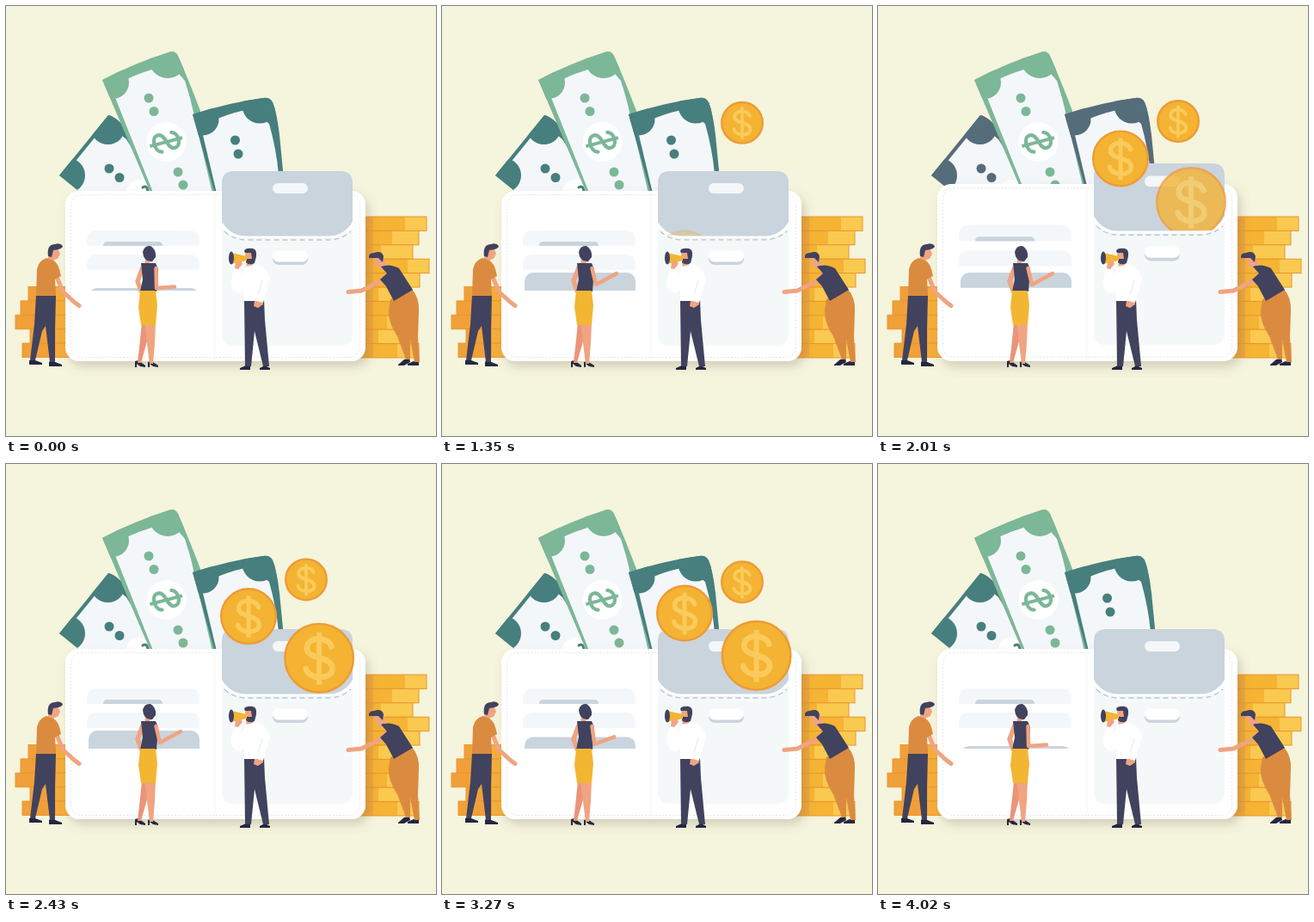
An HTML page for the animation above (4.05 s loop, 500 by 500 pixels).

```html
<!DOCTYPE html>
<html lang="en">
<head>
<meta charset="utf-8">
<title>Wallet</title>
<style>
  html, body { margin: 0; width: 100%; height: 100%; overflow: hidden; background: #f5f4dd; }
  svg { display: block; width: 100%; height: 100%; }
  .teal { fill: var(--teal, #467f7d); }
  .green { fill: #7cb798; }
  .paper { fill: #f4f7fa; }
  .white { fill: #fff; }
  .grey { fill: #cad4dd; }
  .navy { fill: #41425d; }
  .dark { fill: #25273f; }
  .skin { fill: #f0a481; }
  .rust { fill: #db8b3f; }
  .line { fill: none; stroke-linecap: round; stroke-linejoin: round; }
  .limb { stroke: #f0a481; }
</style>
</head>
<body>
<svg viewBox="0 0 500 500">
  <defs>
    <filter id="shadow" x="-10%" y="-10%" width="125%" height="130%">
      <feDropShadow dx="4" dy="6" stdDeviation="6" flood-color="#75705a" flood-opacity=".28"/>
    </filter>
    <g id="dollar" class="line">
      <path d="M14 -13C10 -25 -14 -25 -14 -11C-14 2 15 -3 15 12C15 25 -12 25 -15 12" stroke-width="6.5"/>
      <path d="M0 -29V30" stroke-width="6" stroke-linecap="butt"/>
    </g>
    <clipPath id="slit"><rect id="slitEdge" width="500" height="267"/></clipPath>
    <clipPath id="cardEdge"><rect id="pocketEdge" x="90" width="140" height="331"/></clipPath>
    <clipPath id="billA"><path d="M62 197L119 127Q133 130 146 155L190 240H115Z"/></clipPath>
    <clipPath id="billB"><path d="M112 86Q150 66 189 54Q196 51 200 58Q212 85 226 122L250 222H170Z"/></clipPath>
    <clipPath id="billC"><path d="M217 126Q260 112 299 107Q307 106 310 112Q315 124 318 150L325 222H244Z"/></clipPath>
  </defs>
  <rect width="500" height="500" fill="#f5f4dd"/>
  <g id="stacks"></g>

  <g clip-path="url(#billA)">
    <rect class="teal" x="50" y="120" width="150" height="110"/>
    <path class="paper" d="M65 200L117 136L140 155L190 235H105Z"/>
    <circle class="teal" cx="118.500" cy="141" r="20"/>
    <circle class="teal" cx="72" cy="197" r="20"/>
    <circle class="teal" cx="120" cy="189" r="5.500"/>
    <circle class="teal" cx="132" cy="199.500" r="5.500"/>
    <circle class="white" cx="156" cy="219" r="17"/>
    <path class="line" d="M159 211Q164 208 165 215" stroke="#467f7d" stroke-width="3"/>
  </g>
  <g clip-path="url(#billB)">
    <rect class="green" x="105" y="45" width="145" height="180"/>
    <path class="paper" d="M122 94Q155 76 192 68L208 87Q215 108 219 128L241 222H173Z"/>
    <circle class="green" cx="124" cy="89" r="19"/>
    <circle class="green" cx="188" cy="62" r="22"/>
    <circle class="green" cx="166" cy="107" r="5.500"/>
    <circle class="green" cx="172" cy="122.500" r="5.500"/>
    <circle class="green" cx="200" cy="193" r="5.500"/>
    <circle class="green" cx="206" cy="208" r="5.500"/>
    <circle class="white" cx="186.500" cy="158" r="23"/>
    <use href="#dollar" stroke="#7cb798" transform="translate(186.500 158) rotate(75) scale(-.66 .66)"/>
  </g>
  <g clip-path="url(#billC)">
    <rect class="teal" x="210" y="100" width="120" height="125"/>
    <path class="paper" d="M228 146L235 136Q255 126 278 121L300 132L306 137Q314 165 317 195V222H246Z"/>
    <circle class="teal" cx="229" cy="132" r="18.500"/>
    <circle class="teal" cx="295" cy="116" r="20.500"/>
    <circle class="teal" cx="266.500" cy="156" r="5.500"/>
    <circle class="teal" cx="270" cy="172" r="5.500"/>
  </g>

  <g id="wallet">
    <rect class="white" x="69" y="215" width="349" height="198" rx="16" filter="url(#shadow)"/>
    <rect x="75.500" y="219.500" width="336" height="189" rx="12" fill="none" stroke="#e4e8ec" stroke-dasharray="2 2"/>
    <path d="M243 217V411" stroke="#f8f9fa" stroke-width="2"/>
    <path class="paper" d="M94 279V273Q94 261 106 261H213Q225 261 225 273V279Z"/>
    <path class="grey" d="M113 279Q113 274 118 274H177Q182 274 182 279Z"/>
    <path class="paper" d="M94 307V301Q94 289 106 289H213Q225 289 225 301V307Z"/>
    <rect x="251" y="222" width="152" height="173" rx="12" fill="#f4f8f9"/>
    <path class="white" d="M251 240H403V258Q392 269 378 269.500H276Q262 269 251 258Z"/>
    <path class="grey" d="M251 206Q251 192 265 192H389Q403 192 403 206V251Q393 267 376 267.500H278Q261 267 251 251Z"/>
    <path d="M254 262Q264 272 280 272H374Q390 272 401 262" fill="none" stroke="#b9c5cf" stroke-width="1.300" stroke-dasharray="6 4"/>
    <rect class="paper" x="310" y="206" width="41" height="12" rx="6"/>
    <rect class="grey" x="310" y="287" width="41" height="14" rx="7"/>
    <rect class="white" x="310" y="284.500" width="41" height="13" rx="6.500"/>
  </g>
  <g clip-path="url(#cardEdge)">
    <rect id="card" class="grey" x="96" y="310" width="129" height="40" rx="10"/>
  </g>
  <g id="coins" clip-path="url(#slit)"></g>

  <!-- man on the left -->
  <g>
    <path class="dark" d="M27 412H34L42 415V417H27ZM50 413.500H56L65 417V419H50Z"/>
    <path class="navy" d="M35 336H58L57 375L57 414H51L46 372L42 378L34 412H28L33 370Z"/>
    <path class="skin" d="M51 283H61L63 288L60 294L56 295L55 302L48 298Z"/>
    <path class="navy" d="M49 291Q47 277 57 277Q63 275 66 279Q66 283 55 284L53 292Z"/>
    <path class="line limb" d="M57 310L66 332L79 344L85 348.500" stroke-width="5"/>
    <path class="rust" d="M47 293Q38 296 36 306L35 337H58L57 318L64 314Q61 298 55 296Z"/>
  </g>

  <!-- woman -->
  <g>
    <path class="dark" d="M150 413L154 412L162 418V420L156 419L152 416V420H150ZM165 414L169 413L177 418V420L171 419L167 416V420H165Z"/>
    <path fill="#ea947a" d="M158 368H168L164 390L157 415H153L156 388Z"/>
    <path class="skin" d="M161 368H174L173 392L171 416H167L164 392Z"/>
    <path class="line limb" d="M159 304L153 320L157 331" stroke-width="5.500"/>
    <path class="skin" d="M163 285L172 287L171 296L167 298V303H161Z"/>
    <path class="navy" d="M159 286Q161 278 168 279Q175 283 174 292L170 297Q160 298 159 286Z"/>
    <path class="navy" d="M157 299H174L177 306L175 332H156L159 318Z"/>
    <path fill="#f3b632" d="M156 331H174L176 348L174 371H157L154 350Z"/>
    <path id="arm" class="line limb" stroke-width="4.500"/>
  </g>

  <!-- man with the megaphone -->
  <g>
    <path class="dark" d="M272 423V421L279 418H284V423ZM295 423V421L301 418L307 421V423Z"/>
    <path class="navy" d="M277 341H300L301 365L306 419H299L289 378L285 419H278Z"/>
    <path class="skin" d="M278 287H287V306H280ZM289 343L298 340L299 347L293 351L288 349Z"/>
    <path class="white" d="M279 303L292 300Q305 305 307 318L299 345L292 343H277V331L271 334Q262 332 261 322L265 306L274 307L273 314Z"/>
    <path d="M298 319L293 336" fill="none" stroke="#e5e9ef"/>
    <path class="navy" d="M277 285Q278 281 287 282Q292 283 291 291L289 299Q283 302 279 298L280 294L286 294L285 287H278Z"/>
    <path fill="#f3b632" d="M262 287L280 291V296L262 300Z"/>
    <ellipse class="navy" cx="262" cy="293" rx="3" ry="7.500"/>
    <path class="skin" d="M267 298L273 296L275 300L270 306L266 305Z"/>
  </g>

  <!-- man on the right -->
  <g>
    <path class="dark" d="M456 417L463 411L469 410L470 414L463 418H456ZM467 418V416L474 413H480V418Z"/>
    <path class="rust" d="M447 341L472 329Q481 340 480 355L479 385L481 414H475L470 388L470 411H465L455 384Q444 368 445 353Z"/>
    <path class="skin" d="M426 290H436L443 300L438 307L431 302Z"/>
    <path class="navy" d="M422 293Q421 287 428 287Q437 284 439 291L438 298L433 293Z"/>
    <path class="line limb" d="M443 313L434 321L413 331L398 332.500" stroke-width="5"/>
    <path class="navy" d="M436 303Q446 299 457 305L473 330L451 343L442 326L435 318L443 311Z"/>
  </g>
</svg>
<script>
  const LOOP = 4050, BASE = 413;
  const NS = 'http://www.w3.org/2000/svg';
  const $ = id => document.getElementById(id);
  const clamp = v => Math.min(1, Math.max(0, v));
  const mix = (a, b, p) => a + (b - a) * p;
  const part = (t, start, length) => clamp((t - start) / length);
  const smooth = p => p * p * (3 - 2 * p);
  const easeOut = p => 1 - (1 - p) ** 2;

  function add(parent, tag, attrs) {
    const el = document.createElementNS(NS, tag);
    for (const key in attrs) el.setAttribute(key, attrs[key]);
    return parent.appendChild(el);
  }

  // Piles of coins seen from the side, one row per outer edge.
  function pile(edges, top, wall, side) {
    edges.forEach((edge, i) => {
      const y = top + i * 16.4;
      const x = Math.min(edge, wall), width = Math.abs(edge - wall);
      const row = (left, w, fill) => add($('stacks'), 'rect', { x: left, y, width: w, height: 16.4, fill });
      if (side === 'left') {
        row(x, width, '#f1a039');
        row(58, 22, '#f5ad3a');
      } else {
        const shine = 25 + i % 3 * 6;
        row(x, width, '#f5b433');
        row(edge - shine, shine, '#fac950');
        row(x, 22, '#f0a537');
      }
      const rim = row(x, width, 'none');
      rim.setAttribute('stroke', '#ea9630');
    });
  }
  pile([26, 17, 11, 28, 19], 326.5, 90, 'left');
  pile([489, 480, 473, 492, 481, 470, 478, 474, 470, 480], 245, 405, 'right');

  const coins = [
    { x: 349, y: 136, r: 25, from: 295, start: 720, rise: 540, fade: 60, sway: 2, drift: 0, phase: 1310 },
    { x: 282, y: 175, r: 33, from: 308, start: 1320, rise: 540, fade: 100, sway: 2.5, drift: 0, phase: 2940 },
    { x: 365, y: 224, r: 41, from: 305, start: 1860, rise: 180, fade: 190, sway: 2, drift: 1, phase: 2940 }
  ];
  for (const coin of coins) {
    coin.el = add($('coins'), 'g', {});
    add(coin.el, 'circle', { r: coin.r - 1.2, fill: '#f4b333', stroke: '#ee9b35', 'stroke-width': 2.4 });
    add(coin.el, 'use', { href: '#dollar', stroke: '#facb5a', transform: `scale(${coin.r / 40})` });
  }
  const pulses = [720, 1350, 1860];

  function draw(time) {
    // The scene rests between the card rising and the first coin.
    const t = time >= 570 && time < 780 ? 570 : time;

    const push = Math.max(...pulses.map(start => Math.sin(Math.PI * part(t, start, 360))));
    const stretch = 1 + 0.042 * push;
    const stretched = y => BASE - (BASE - y) * stretch;
    $('wallet').setAttribute('transform', `translate(0 ${stretched(0)}) scale(1 ${stretch})`);
    $('slitEdge').setAttribute('height', stretched(267));
    $('pocketEdge').setAttribute('height', stretched(331));
    const tint = [[70, 86], [127, 107], [125, 122]].map(([a, b]) => Math.round(mix(a, b, push * push)));
    document.documentElement.style.setProperty('--teal', `rgb(${tint})`);

    const lift = smooth(part(t, 105, 465)) - smooth(part(t, 3060, 480));
    $('card').setAttribute('y', mix(328, 310, lift));
    const elbow = `${mix(175, 179, lift)} ${mix(328, 324, lift)}`;
    const hand = `${mix(196, 203, lift)} ${mix(326.5, 311, lift)}`;
    $('arm').setAttribute('d', `M174.500 305L${elbow}L${hand}`);

    for (const c of coins) {
      const drop = part(t, 3640, 330);
      const wave = Math.sin(2 * Math.PI * (t - c.phase) / 3180);
      const out = easeOut(part(t, c.start, c.rise)) * (1 - drop * drop);
      const y = mix(c.from, c.y - c.sway * wave, out);
      c.el.setAttribute('transform', `translate(${c.x + c.drift * wave} ${y})`);
      c.el.setAttribute('opacity', part(t, c.start, c.fade) * (1 - part(drop, 0.5, 0.5)));
    }
  }

  const began = performance.now();
  function tick() {
    draw((performance.now() - began) % LOOP);
    requestAnimationFrame(tick);
  }
  draw(0);
  requestAnimationFrame(tick);
</script>
</body>
</html>
```
